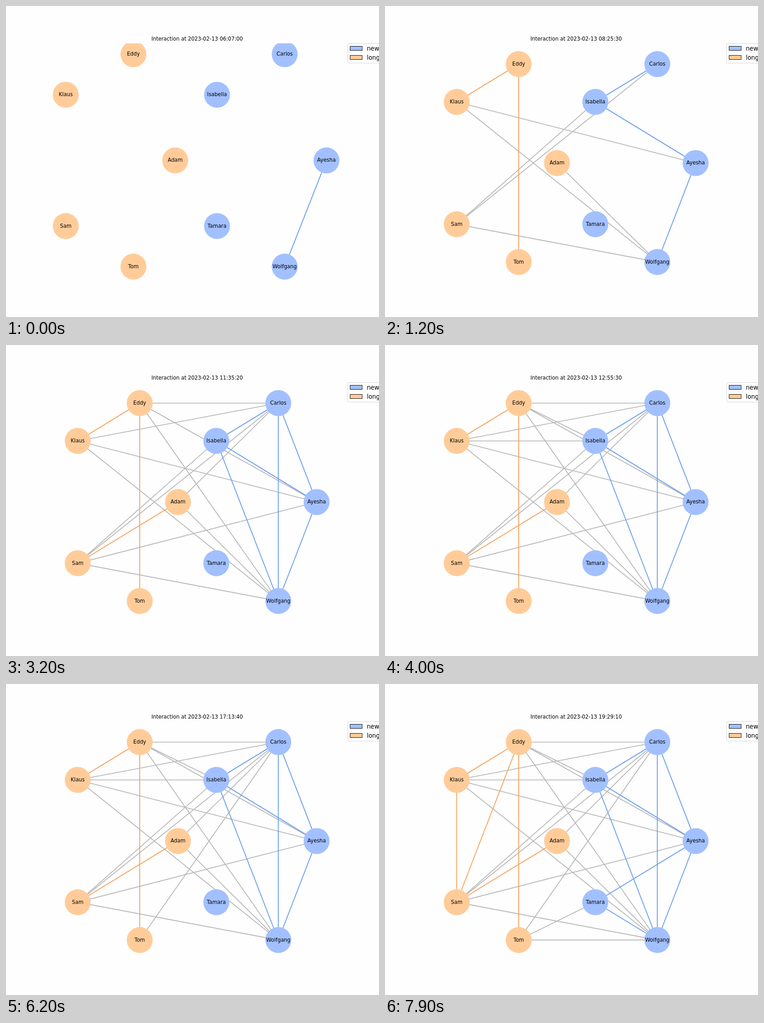
An HTML page with a canvas for the animation above (8000 ms loop, 820x683 px).

```html
<!DOCTYPE html>
<html lang="en">
<head>
<meta charset="utf-8">
<title>Interaction graph</title>
<style>
  html, body { margin: 0; width: 100%; height: 100%; overflow: hidden; background: #fefefe; }
  canvas { display: block; }
</style>
</head>
<body>
<canvas id="stage" width="820" height="683"></canvas>
<script>
const ctx = document.getElementById('stage').getContext('2d');
const STEP = 100, STEPS = 80;
const AXES = { left: 102.5, right: 738, top: 81.96, bottom: 607.87 };
const RADIUS = 28.5, LINE = 1.9;
const FONT = '"DejaVu Sans", Verdana, sans-serif';
const BLUE = '#a2c0ff', ORANGE = '#ffcc99';
const LINES = { mixed: '#b9b9b9', long: '#f5a25d', new: '#689eee' };

// Each group is a unit ring of five; the second sits 2.5 to the right.
const nodes = {};
function addRing(group, shift, names) {
  names.forEach((name, i) => {
    const a = i * Math.PI * 2 / 5;
    nodes[name] = { name, group, x: shift + Math.cos(a), y: Math.sin(a) };
  });
}
addRing('long', 0, ['Adam', 'Eddy', 'Klaus', 'Sam', 'Tom']);
addRing('new', 2.5, ['Ayesha', 'Carlos', 'Isabella', 'Tamara', 'Wolfgang']);
const people = Object.values(nodes);

// First step of each link
const edges = [
  [0, 'Ayesha', 'Wolfgang'], [1, 'Isabella', 'Ayesha'], [2, 'Adam', 'Wolfgang'],
  [4, 'Klaus', 'Ayesha'], [5, 'Sam', 'Wolfgang'], [6, 'Isabella', 'Sam'],
  [8, 'Klaus', 'Wolfgang'], [9, 'Eddy', 'Klaus'], [10, 'Eddy', 'Tom'],
  [11, 'Carlos', 'Isabella'], [12, 'Carlos', 'Sam'], [13, 'Eddy', 'Ayesha'],
  [14, 'Carlos', 'Ayesha'], [16, 'Sam', 'Ayesha'], [17, 'Eddy', 'Wolfgang'],
  [21, 'Adam', 'Carlos'], [25, 'Adam', 'Sam'], [28, 'Klaus', 'Carlos'],
  [29, 'Carlos', 'Wolfgang'], [30, 'Isabella', 'Wolfgang'], [32, 'Eddy', 'Carlos'],
  [34, 'Klaus', 'Isabella'], [36, 'Eddy', 'Isabella'], [58, 'Tom', 'Carlos'],
  [63, 'Eddy', 'Sam'], [66, 'Klaus', 'Sam'], [68, 'Ayesha', 'Tamara'],
  [70, 'Tamara', 'Wolfgang'], [72, 'Tom', 'Wolfgang'], [76, 'Tamara', 'Tom']
].map(([start, a, b]) => {
  const from = nodes[a], to = nodes[b];
  return { start, from, to, kind: from.group === to.group ? from.group : 'mixed' };
});

// Step and clock time in seconds
const clock = [
  [0, 22020], [8, 28300], [18, 33370], [32, 41720],
  [49, 51950], [62, 62020], [79, 70150]
];

function timeText(step) {
  const i = Math.max(1, clock.findIndex(c => c[0] >= step));
  const [s0, t0] = clock[i - 1], [s1, t1] = clock[i];
  const sec = Math.round((t0 + (t1 - t0) * (step - s0) / (s1 - s0)) / 10) * 10;
  return [sec / 3600, sec / 60 % 60, sec % 60]
    .map(v => String(Math.floor(v)).padStart(2, '0')).join(':');
}

// Range of all nodes, widened by the padded range of the linked ones
function limits(key, linked) {
  const all = people.map(n => n[key]), some = linked.map(n => n[key]);
  const low = Math.min(...some), high = Math.max(...some), pad = (high - low) * 0.05;
  const min = Math.min(...all, low - pad), max = Math.max(...all, high + pad);
  const margin = (max - min) * 0.05;
  return [min - margin, max + margin];
}

function projection(shown) {
  const linked = shown.flatMap(e => [e.from, e.to]);
  const [x0, x1] = limits('x', linked), [y0, y1] = limits('y', linked);
  return n => [
    AXES.left + (n.x - x0) / (x1 - x0) * (AXES.right - AXES.left),
    AXES.bottom - (n.y - y0) / (y1 - y0) * (AXES.bottom - AXES.top)
  ];
}

function write(text, x, y, size, align) {
  ctx.font = size + 'px ' + FONT;
  ctx.textAlign = align;
  ctx.fillStyle = '#000';
  ctx.fillText(text, x, y);
}

function drawLegend() {
  ctx.beginPath();
  ctx.roundRect(751.2, 82.4, 110, 43, 2.7);
  ctx.fillStyle = '#fefefe';
  ctx.fill();
  ctx.lineWidth = 0.95;
  ctx.strokeStyle = '#d4d4d4';
  ctx.stroke();
  [['new', BLUE], ['long', ORANGE]].forEach(([label, color], i) => {
    const y = 88.5 + i * 20;
    ctx.fillStyle = color;
    ctx.fillRect(756.5, y, 26.5, 9);
    ctx.strokeStyle = '#000';
    ctx.strokeRect(756.5, y, 26.5, 9);
    write(label, 793.2, 98 + i * 20, 13.28, 'left');
  });
}

function draw(step) {
  const shown = edges.filter(e => e.start <= step);
  const place = projection(shown);
  ctx.fillStyle = '#fefefe';
  ctx.fillRect(0, 0, 820, 683);

  ctx.save();
  ctx.beginPath();
  ctx.rect(AXES.left, 82, AXES.right - AXES.left, AXES.bottom - 82);
  ctx.clip();
  ctx.lineWidth = LINE;
  for (const kind in LINES) {
    ctx.strokeStyle = LINES[kind];
    shown.filter(e => e.kind === kind).forEach(e => {
      ctx.beginPath();
      ctx.moveTo(...place(e.from));
      ctx.lineTo(...place(e.to));
      ctx.stroke();
    });
  }
  for (const n of people) {
    const [x, y] = place(n);
    ctx.beginPath();
    ctx.arc(x, y, RADIUS, 0, Math.PI * 2);
    ctx.fillStyle = n.group === 'new' ? BLUE : ORANGE;
    ctx.fill();
  }
  for (const n of people) {
    const [x, y] = place(n);
    write(n.name, x, Math.round(y + 3.3), 11.39, 'center');
  }
  ctx.restore();

  write('Interaction at 2023-02-13 ' + timeText(step), 420.25, 76, 11.39, 'center');
  drawLegend();
}

const begin = performance.now();
let last = -1;
function tick() {
  const step = Math.floor((performance.now() - begin) / STEP) % STEPS;
  if (step !== last) draw(last = step);
  requestAnimationFrame(tick);
}
tick();
</script>
</body>
</html>
```
